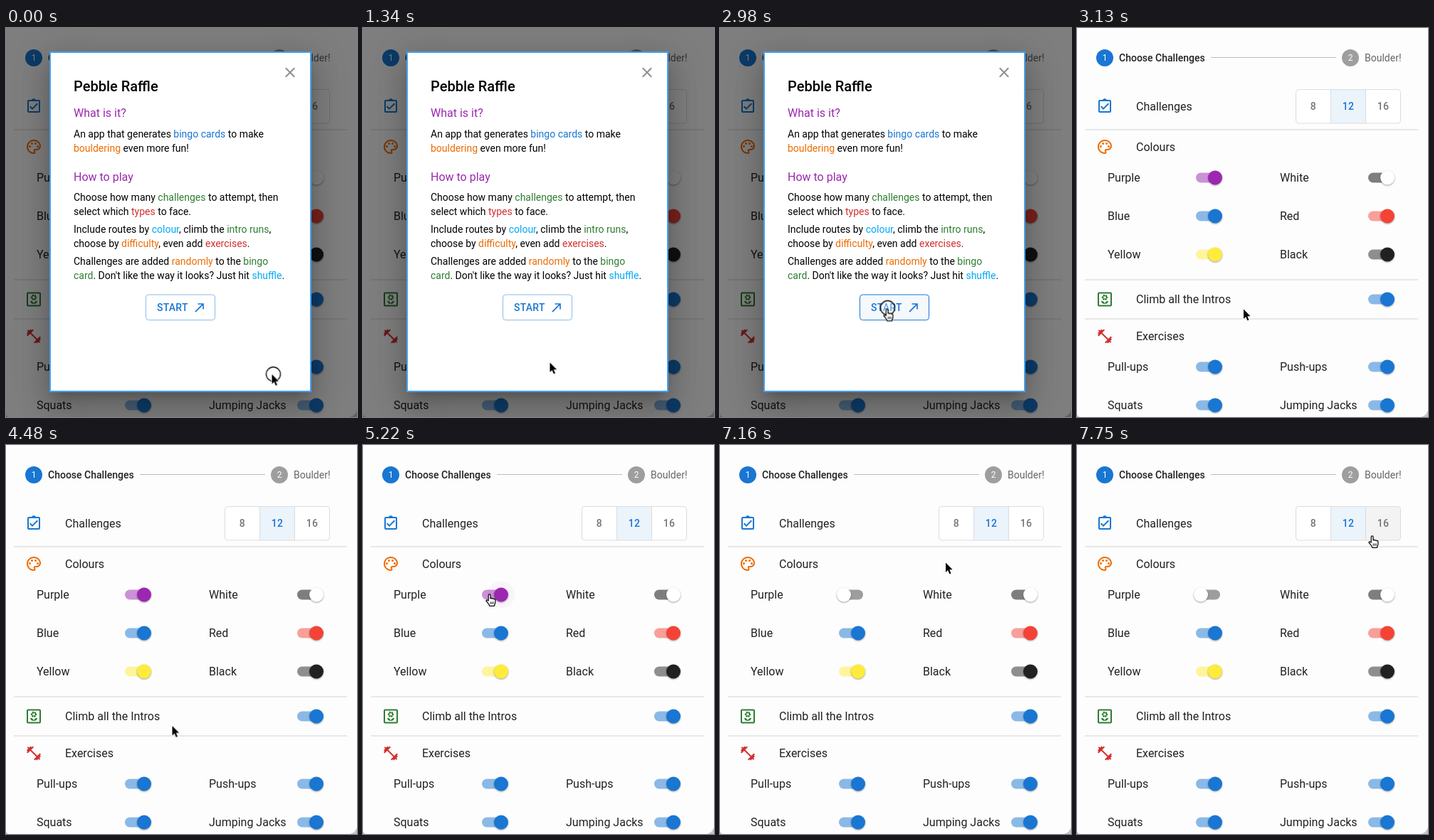
Animation of 493 by 547 pixels, one loop 8000 ms. Source, as an HTML page:

```html
<!DOCTYPE html>
<html lang="en">
<head>
<meta charset="utf-8">
<title>Challenge cards</title>
<style>
html, body { margin: 0; width: 100%; height: 100%; overflow: hidden; background: #fdfdfd; }
body { position: relative; font-family: Roboto, Arial, sans-serif; }
svg { position: absolute; left: 0; top: 0; width: 493px; height: 547px; }
svg *, #dialog { animation-duration: 8s; animation-timing-function: step-end; animation-iteration-count: infinite; }
text { white-space: pre; }

/* Page */
#page {
  --blue: #1976d2; --orange: #ed6c02; --green: #2e7d32; --red: #d32f2f; --grey: #9e9e9e;
  background: #fdfdfd;
}
.label { font-size: 16px; fill: #212121; }
.step { font-size: 14px; }
.num { font-size: 12px; fill: #fff; text-anchor: middle; }
.count { font-size: 14px; font-weight: 500; letter-spacing: .4px; text-anchor: middle; fill: #757575; }
.rule { stroke: #e2e2e2; stroke-width: 1.6; }

/* Switches: --c thumb, --t track, --x thumb offset, --halo hover */
.track { fill: var(--t, var(--c)); opacity: var(--to, .5); }
.thumb { fill: var(--c); filter: drop-shadow(0 1px 1.2px rgba(0,0,0,.38)); transform: translateX(var(--x, 10px)); }
.halo { fill: var(--t, var(--c)); opacity: var(--halo, 0); transform: translateX(var(--x, 10px)); }
#purple { --c: #9c27b0; --t: #9c27b0; --to: .5; --x: 10px; --halo: 0; animation-name: purple; }
#sky { --c: var(--blue); animation-name: sky; }
@keyframes purple {
  0% { --c: #9c27b0; --t: #9c27b0; --to: .5; --x: 10px; --halo: 0; }
  63.375% { --c: #9c27b0; --t: #9c27b0; --to: .5; --x: 10px; --halo: .04; }
  85.75% { --c: #b65cc5; --t: #7d2a8b; --to: .46; --x: 6px; --halo: .04; }
  87.625% { --c: #fff; --t: #000; --to: .38; --x: -10px; --halo: .03; }
  89.5%, 100% { --c: #fff; --t: #000; --to: .38; --x: -10px; --halo: 0; }
}
@keyframes sky {
  0%, 63.375%, 100% { --halo: 0; }
  61.5% { --halo: .06; }
}
#sixteen { animation-name: sixteen; }
@keyframes sixteen {
  0% { fill: #fff; }
  96.875%, 100% { fill: #f3f3f3; }
}

/* Dialog over a half-black backdrop */
#dialog { position: absolute; inset: 0; background: rgba(0,0,0,.5); animation-name: dialog; }
@keyframes dialog {
  0% { visibility: visible; }
  39.125%, 100% { visibility: hidden; }
}
#box {
  position: absolute; left: 61px; top: 33px; width: 364px; height: 475px;
  background: #fff; border: 2px solid #42a0f0;
  box-shadow: 0 11px 15px -7px rgba(0,0,0,.2), 0 24px 38px 3px rgba(0,0,0,.14), 0 9px 46px 8px rgba(0,0,0,.12);
}
#body { font-size: 14px; fill: #000; }
#body .head { font-size: 16px; fill: #9c27b0; }
#body .title { font-size: 20px; font-weight: 500; }
.b { fill: #1976d2; } .o { fill: #ed6c02; } .g { fill: #2e7d32; } .r { fill: #d32f2f; } .s { fill: #03a9f4; }
#start { animation-name: start; }
@keyframes start {
  0% { fill: #fff; stroke: #8cbae8; }
  22.25% { fill: #fafcfe; stroke: #5398dd; }
  24.125%, 100% { fill: #f5f9fd; stroke: #1976d2; }
}

/* Pointer */
#pointer { animation-name: travel; }
@keyframes travel {
  0% { transform: translate(372.5px, 486.5px); }
  11.25% { transform: translate(368px, 487px); }
  13.125% { transform: translate(335px, 489px); }
  15% { transform: translate(305px, 488px); }
  16.75% { transform: translate(261.5px, 470px); }
  18.625% { transform: translate(236px, 442px); }
  20.5% { transform: translate(229px, 415px); }
  22.25% { transform: translate(232px, 399px); }
  24.125% { transform: translate(233px, 394.5px); }
  39.125% { transform: translate(233px, 395px); }
  56% { transform: translate(232.5px, 394.5px); }
  57.875% { transform: translate(208px, 334px); }
  59.625% { transform: translate(197px, 281px); }
  61.5% { transform: translate(189px, 238px); }
  63.375% { transform: translate(176px, 212px); }
  65.25% { transform: translate(176px, 209px); }
  87.625% { transform: translate(182px, 209px); }
  89.5% { transform: translate(316px, 165px); }
  91.375% { transform: translate(393px, 149px); }
  95% { transform: translate(413px, 128px); }
  96.875%, 100% { transform: translate(413px, 127px); }
}
#arrow { animation-name: arrow; }
#hand { animation-name: hand; }
@keyframes arrow {
  0%, 39.125%, 89.5% { opacity: 1; }
  22.25%, 61.5%, 95%, 100% { opacity: 0; }
}
@keyframes hand {
  0%, 39.125%, 89.5% { opacity: 0; }
  22.25%, 61.5%, 95%, 100% { opacity: 1; }
}
#ring { animation-name: ring; }
@keyframes ring {
  0% { transform: translate(375.5px, 486.7px); opacity: 1; }
  1.875% { transform: translate(235.5px, 393.5px); opacity: 0; }
  37.25% { transform: translate(235.5px, 393.5px); opacity: 1; }
  39.125% { transform: translate(178.5px, 207.5px); opacity: 0; }
  84% { transform: translate(178.5px, 207.5px); opacity: 1; }
  85.75%, 100% { transform: translate(178.5px, 207.5px); opacity: 0; }
}
</style>
</head>
<body>
<svg id="page" viewBox="0 0 493 547">
  <defs>
    <g id="switch">
      <rect class="track" x="-17" y="-7" width="34" height="14" rx="7"/>
      <circle class="halo" r="19"/>
      <circle class="thumb" r="10"/>
    </g>
  </defs>

  <circle cx="39" cy="42" r="12" fill="var(--blue)"/>
  <text class="num" x="39" y="46.2">1</text>
  <text class="step" x="59" y="46.5" font-weight="500" fill="#212121">Choose Challenges</text>
  <path d="M188 41.5H364" stroke="#bdbdbd"/>
  <circle cx="384" cy="42" r="12" fill="var(--grey)"/>
  <text class="num" x="384" y="46.2">2</text>
  <text class="step" x="404" y="46.5" fill="#666">Boulder!</text>

  <!-- Challenge count -->
  <g transform="translate(27 98)" fill="none" stroke="var(--blue)" stroke-width="2">
    <rect x="4" y="4" width="16" height="16" rx="1"/>
    <path d="M6.7 12.3l3.3 3.3 7.3-7.3"/>
    <path d="M9.3 3.4a2.8 2.4 0 0 1 5.4 0z" fill="var(--blue)" stroke-width="1"/>
  </g>
  <text class="label" x="83" y="116">Challenges</text>
  <rect x="307.5" y="86.5" width="147" height="47.5" rx="4" fill="#fff"/>
  <path id="sixteen" d="M405.5 86.5H450.5a4 4 0 0 1 4 4V130a4 4 0 0 1-4 4H405.5z"/>
  <path d="M356.5 86.5h49V134h-49z" fill="#ebf3fb"/>
  <g fill="none" stroke="#dcdcdc">
    <rect x="307.5" y="86.5" width="147" height="47.5" rx="4"/>
    <path d="M356.5 86.5V134M405.5 86.5V134"/>
  </g>
  <text class="count" x="332" y="115.3">8</text>
  <text class="count" x="381" y="115.3" style="fill:var(--blue)">12</text>
  <text class="count" x="430" y="115.3">16</text>
  <path class="rule" d="M11 143H479M11 354H479M11 409H479"/>

  <!-- Colours -->
  <g transform="translate(27 155)" fill="var(--orange)">
    <path d="M12 22C6.5 22 2 17.5 2 12S6.5 2 12 2s10 4 10 9c0 3.3-2.7 6-6 6h-1.8c-.3 0-.5.2-.5.5 0 .1.1.2.1.3.4.5.7 1.1.7 1.7A2.5 2.5 0 0 1 12 22zm0-18c-4.4 0-8 3.6-8 8s3.6 8 8 8c.3 0 .5-.2.5-.5 0-.2-.1-.3-.1-.4-.4-.4-.7-1-.7-1.6a2.5 2.5 0 0 1 2.5-2.5H16c2.2 0 4-1.8 4-4 0-3.9-3.6-7-8-7z"/>
    <circle cx="6.5" cy="11.5" r="1.5"/><circle cx="9.5" cy="7.5" r="1.5"/>
    <circle cx="14.5" cy="7.5" r="1.5"/><circle cx="17.5" cy="11.5" r="1.5"/>
  </g>
  <g class="label">
    <text x="83" y="173">Colours</text>
    <text x="43" y="216">Purple</text><text x="285" y="216">White</text>
    <text x="43" y="270">Blue</text><text x="285" y="270">Red</text>
    <text x="43" y="324">Yellow</text><text x="285" y="324">Black</text>
    <text x="83" y="387">Climb all the Intros</text>
    <text x="83" y="439">Exercises</text>
    <text x="43" y="482">Pull-ups</text><text x="285" y="482">Push-ups</text>
    <text x="43" y="536">Squats</text><text x="285" y="536">Jumping Jacks</text>
  </g>
  <use id="purple" href="#switch" x="184" y="210.5"/>
  <use href="#switch" x="426" y="210.5" style="--c:#fff;--t:#000"/>
  <use id="sky" href="#switch" x="184" y="264.5"/>
  <use href="#switch" x="426" y="264.5" style="--c:#f44336"/>
  <use href="#switch" x="184" y="318.5" style="--c:#ffeb3b"/>
  <use href="#switch" x="426" y="318.5" style="--c:#212121"/>
  <g style="--c:var(--blue)">
    <use href="#switch" x="426" y="381.5"/>
    <use href="#switch" x="184" y="476.5"/>
    <use href="#switch" x="426" y="476.5"/>
    <use href="#switch" x="184" y="530.5"/>
    <use href="#switch" x="426" y="530.5"/>
  </g>

  <!-- Intros and exercises -->
  <g transform="translate(27 369.5)" fill="none" stroke="var(--green)">
    <rect x="3" y="3" width="18" height="18" rx="1" stroke-width="2"/>
    <circle cx="12" cy="9.4" r="2.9" stroke-width="2.8" stroke-linecap="round" stroke-dasharray="0 3.037"/>
    <path d="M12 18.6c-2.8 0-4.8-1.7-5-4.4 2.8.1 4.8 1.6 5 4.4zc2.8 0 4.8-1.7 5-4.4-2.8.1-4.8 1.6-5 4.4z" fill="var(--green)" stroke="none"/>
  </g>
  <path transform="translate(27 421.5)" fill="var(--red)" d="M20.6 14.9 22 13.4 20.6 12 17 15.6 8.4 7 12 3.4 10.6 2 9.1 3.4 7.7 2 5.6 4.1 4.1 2.7 2.7 4.1l1.4 1.5L2 7.7l1.4 1.4L2 10.6 3.4 12 7 8.4l8.6 8.6L12 20.6l1.4 1.4 1.5-1.4 1.4 1.4 2.1-2.1 1.5 1.4 1.4-1.4-1.4-1.5L22 16.3z"/>

  <path d="M493 537.5v9.5h-10q7.5-1.5 10-9.5zM0 543v4h4q-3-.5-4-4z" fill="#c4c4c4"/>
</svg>

<div id="dialog">
  <div id="box"></div>
  <svg viewBox="0 0 493 547">
    <path d="M392.8 56.3l12.4 12.4m0-12.4l-12.4 12.4" stroke="#8e8e8e" stroke-width="2"/>
    <g id="body">
      <text class="title" x="95" y="89">Pebble Raffle</text>
      <text class="head" x="95" y="125">What is it?</text>
      <text x="95" y="154">An app that generates <tspan class="b">bingo cards</tspan> to make</text>
      <text x="95" y="174"><tspan class="o">bouldering</tspan> even more fun!</text>
      <text class="head" x="95" y="215">How to play</text>
      <text x="95" y="243">Choose how many <tspan class="g">challenges</tspan> to attempt, then</text>
      <text x="95" y="263">select which <tspan class="r">types</tspan> to face.</text>
      <text x="95" y="288">Include routes by <tspan class="s">colour</tspan>, climb the <tspan class="g">intro runs</tspan>,</text>
      <text x="95" y="308">choose by <tspan class="o">difficulty</tspan>, even add <tspan class="r">exercises</tspan>.</text>
      <text x="95" y="333">Challenges are added <tspan class="o">randomly</tspan> to the <tspan class="g">bingo</tspan></text>
      <text x="95" y="353"><tspan class="g">card</tspan>. Don't like the way it looks? Just hit <tspan class="s">shuffle</tspan>.</text>
    </g>
    <rect id="start" x="196.5" y="375" width="97" height="35.7" rx="4"/>
    <text class="b" x="212" y="397.5" font-size="14" font-weight="500" letter-spacing=".3">START</text>
    <path class="b" transform="translate(262 383) scale(.8333)" d="M9 5v2h6.6L4 18.6 5.4 20 17 8.4V15h2V5z"/>
  </svg>
</div>

<svg viewBox="0 0 493 547">
  <circle id="ring" r="10" fill="rgba(255,255,255,.35)" stroke="#000" stroke-width="1.3"/>
  <g id="pointer">
    <path id="arrow" d="M1 .5V14l3.1-2.9 2.2 5.2 2.2-.9-2.2-5.1h4.3z" stroke="#fff" stroke-width="1.6" paint-order="stroke"/>
    <g id="hand" transform="translate(-4 0)" fill="#fff" stroke="#000" stroke-linejoin="round">
      <path d="M4.2 10V2.3a1.4 1.4 0 0 1 2.8 0V7c.3-.9 2.3-.9 2.5.3.4-.9 2.2-.7 2.4.5.5-.6 2-.3 2 1V12c0 2-1.2 3-1.4 5.3H5.8C5.2 14.5 2.6 12.5 1.2 10.4c-.6-1.2.9-2 1.8-1.2z" stroke-width="1.2"/>
      <path d="M7.2 11.5v3.2M9.2 11.5v3.2M11.2 11.5v3.2" stroke-width=".9"/>
    </g>
  </g>
</svg>
</body>
</html>
```
